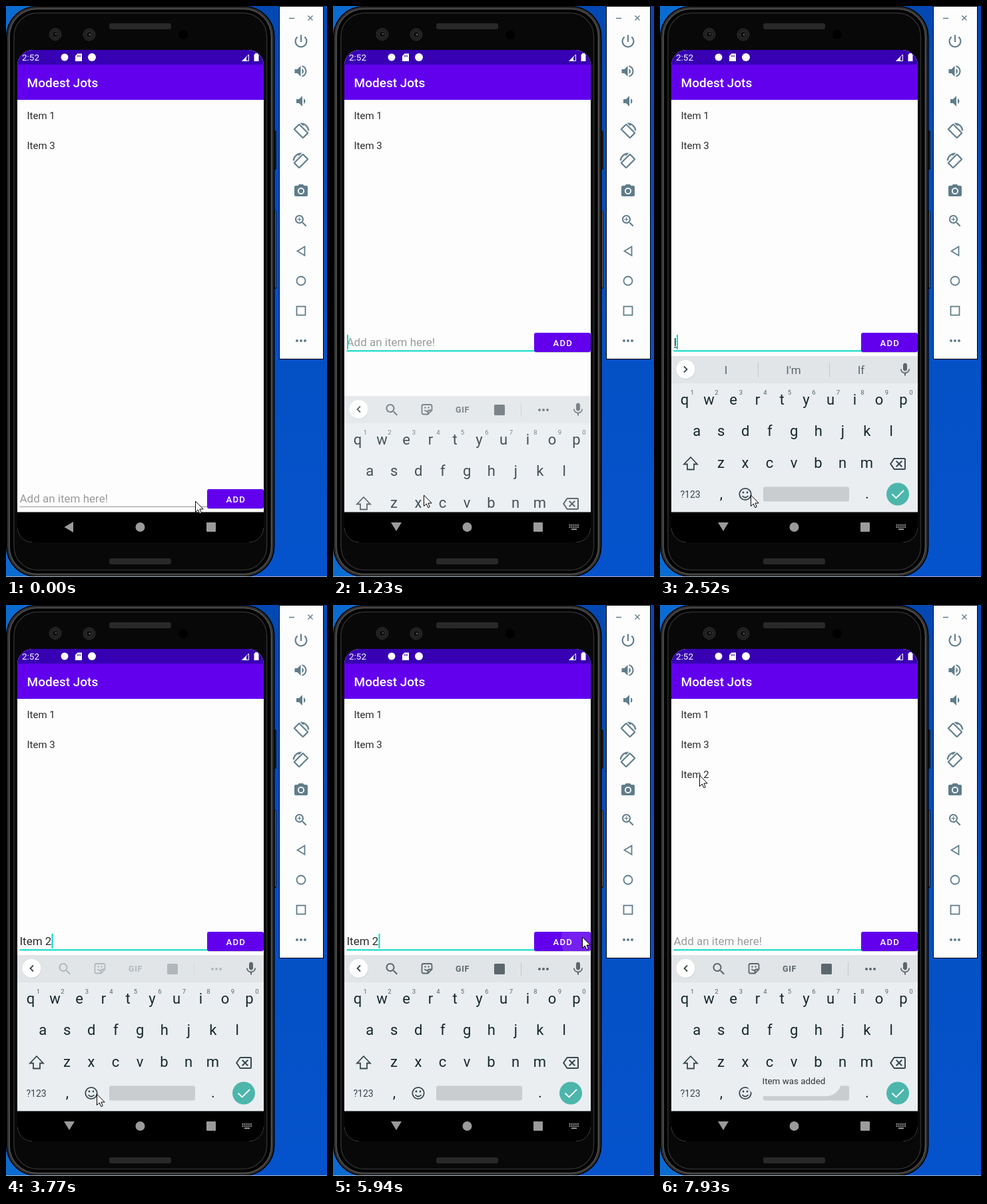
These frames come from a looping animation (482x858 px, 8 s). An HTML page:

```html
<!DOCTYPE html>
<html lang="en">
<head>
<meta charset="utf-8">
<title>Todo list on a phone</title>
<style>
html, body { margin: 0; width: 100%; height: 100%; overflow: hidden; background: #0450c4; }
svg { display: block; width: 482px; height: 858px; font-family: Roboto, "Noto Sans", sans-serif; }
.mid { text-anchor: middle; }
.line { fill: none; stroke-width: 1.8; }
text { white-space: pre; }
</style>
</head>
<body>
<svg viewBox="0 0 482 858" xmlns="http://www.w3.org/2000/svg">
  <defs>
    <linearGradient id="desk" x1="0" y1="0" x2="0" y2="1">
      <stop offset="0" stop-color="#0348b2"/><stop offset=".55" stop-color="#0450c4"/><stop offset="1" stop-color="#0553cc"/>
    </linearGradient>
    <clipPath id="screen"><rect x="17" y="66" width="370" height="740" rx="23"/></clipPath>
    <clipPath id="button"><rect x="302" y="491" width="85" height="29" rx="3"/></clipPath>
    <clipPath id="keysArea"><rect x="17" y="141" width="370" height="620"/></clipPath>
    <path id="search" d="M15.5 14h-.79l-.28-.27C15.41 12.59 16 11.11 16 9.5 16 5.91 13.09 3 9.5 3S3 5.91 3 9.5 5.91 16 9.5 16c1.61 0 3.09-.59 4.23-1.57l.27.28v.79l5 4.99L20.49 19l-4.99-5zm-6 0C7.01 14 5 11.99 5 9.5S7.01 5 9.5 5 14 7.01 14 9.5 11.99 14 9.5 14z"/>
    <path id="rotate" stroke="#607d8b" stroke-width=".9" d="M16.48 2.52c3.27 1.55 5.61 4.72 5.97 8.48h1.5C23.44 4.84 18.29 0 12 0l-.66.03 3.81 3.81 1.33-1.32zm-6.25-.77c-.59-.59-1.54-.59-2.12 0L1.75 8.11c-.59.59-.59 1.54 0 2.12l12.02 12.02c.59.59 1.54.59 2.12 0l6.36-6.36c.59-.59.59-1.54 0-2.12L10.23 1.75zm4.6 19.44L2.81 9.17l6.36-6.36 12.02 12.02-6.36 6.36z"/>
    <path id="mic" d="M12 14c1.66 0 2.99-1.34 2.99-3L15 5c0-1.66-1.34-3-3-3S9 3.34 9 5v6c0 1.66 1.34 3 3 3zm5.3-3c0 3-2.54 5.1-5.3 5.1S6.7 14 6.7 11H5c0 3.41 2.72 6.23 6 6.72V21h2v-3.28c3.28-.48 6-3.3 6-6.72h-1.7z"/>
    <g id="dots"><circle cx="-6" r="2"/><circle r="2"/><circle cx="6" r="2"/></g>
    <pattern id="mesh" width="3" height="3" patternUnits="userSpaceOnUse"><rect width="3" height="3" fill="#303030"/><path d="M0 3L3 0" stroke="#1a1a1a"/></pattern>
  </defs>

  <!-- desktop and phone body -->
  <rect width="482" height="858" fill="url(#desk)"/>
  <rect width="60" height="858" fill="#0a6cd0"/>
  <rect x="401" y="187" width="5" height="59" rx="1.5" fill="#181818"/>
  <rect x="401" y="308" width="5" height="117" rx="1.5" fill="#181818"/>
  <path d="M404.5 309V423" stroke="#6a6a6a"/>
  <rect x=".5" y=".5" width="402.5" height="857" rx="45" fill="#0a0a0a" stroke="#000"/>
  <rect x="4" y="3.5" width="395.5" height="851" rx="42" fill="#080808" stroke="#333" stroke-width="4"/>
  <rect x="5" y="4.5" width="393.5" height="849" rx="41" fill="none" stroke="#5c5c5c"/>
  <rect x="8.5" y="7.5" width="386.5" height="843" rx="38" fill="none" stroke="#000" stroke-width="4"/>
  <rect x="12" y="10.5" width="379.5" height="837" rx="35" fill="#080808" stroke="#2c2c2c" stroke-width="1.5"/>
  <rect y="857" width="482" height="1" fill="#a8b4c4"/>
  <g fill="url(#mesh)"><rect x="155" y="26" width="93" height="9" rx="3"/><rect x="155" y="830" width="93" height="9" rx="3"/></g>
  <g fill="#1f1f1f" stroke="#2f2f2f"><circle cx="74" cy="42.5" r="9"/><circle cx="125" cy="43" r="9"/></g>
  <g fill="#0c0c0c" stroke="#393939"><circle cx="74" cy="42.5" r="4.5"/><circle cx="125" cy="43" r="4.5"/></g>
  <circle cx="126" cy="43" r="1.5" fill="#555"/><circle cx="75" cy="42" r="1.5" fill="#444"/>
  <circle cx="266" cy="43" r="7" fill="#000"/>

  <!-- app -->
  <g clip-path="url(#screen)">
    <rect x="17" y="66" width="370" height="740" fill="#fdfdfd"/>
    <rect x="17" y="66" width="370" height="23" fill="#3700b3"/>
    <rect x="17" y="88" width="370" height="53" fill="#6200ee"/>
    <g fill="#fff">
      <text x="24" y="82" font-size="13.5">2:52</text>
      <circle cx="88" cy="77" r="5.5"/><circle cx="129" cy="77" r="6"/>
      <path d="M107.5 71.5H114V83H104V75Z"/>
      <path d="M107.5 74v2.5m2-2.5v2.5m2-2.5v2.5" stroke="#3700b3"/>
      <path d="M355 82.5L364.5 73V82.5Z" fill="none" stroke="#fff"/><path d="M354 83L361 76V83Z"/>
      <path d="M374 71h4v1.5h1.5V83h-7V72.5h1.5z"/>
      <text x="31.5" y="122" font-size="19" font-weight="500">Modest Jots</text>
    </g>
    <g font-size="15" fill="#2c2c2c">
      <text x="31.5" y="169.5">Item 1</text><text x="31.5" y="215">Item 3</text>
      <text id="added" x="31.5" y="260">Item 2</text>
    </g>

    <g id="field">
      <text id="entry" x="20.5" y="511" font-size="17"></text>
      <rect id="compose" x="21" y="512.5" height="1.2" fill="#333"/>
      <rect id="rule" x="20.5" width="282"/>
      <rect id="caret" y="494" width="2" height="22" fill="#03dac5"/>
      <rect x="302" y="492" width="85" height="29" rx="3" fill="#000" opacity=".18"/>
      <rect x="302" y="491" width="85" height="29" rx="3" fill="#6200ee"/>
      <circle id="ripple" cx="379" cy="503" fill="#fff" clip-path="url(#button)"/>
      <text x="330.5" y="511" font-size="13.2" font-weight="500" letter-spacing="1.2" fill="#fff">ADD</text>
    </g>

    <g clip-path="url(#keysArea)"><g id="board">
      <rect x="17" y="526" width="370" height="235" fill="#eaeef1"/>
      <rect x="17" y="526" width="370" height="41" fill="#e1e5e8"/>
      <circle cx="39" cy="547" r="14" fill="#b8bec2" opacity=".5"/><circle cx="38.5" cy="546" r="14" fill="#fff"/>
      <path id="chevron" class="line" stroke="#37474f"/>
      <g id="tools" fill="#5b676d" stroke="#5b676d" stroke-width="0">
        <use href="#search" transform="translate(76.5 535)"/>
        <path class="line" d="M136 539h10q2.5 0 2.5 2.5v6l-6 6h-6.500q-2.500 0-2.500-2.500v-9.500q0-2.500 2.500-2.500zM148.500 547.500h-3.500q-2.500 0-2.500 2.500v3.500M137.500 547q2 3 5 1.500"/>
        <circle cx="138.5" cy="543.5" r="1.2"/><circle cx="143.5" cy="543.5" r="1.2"/>
        <text class="mid" x="194.5" y="550.5" font-size="12.5" font-weight="700" letter-spacing=".6">GIF</text>
        <rect x="242" y="539" width="16" height="16" rx="1.5"/>
        <path d="M282.5 537V557" stroke="#c3c8cc" stroke-width="1"/>
        <use href="#dots" x="316" y="547"/>
      </g>
      <g id="hints" font-size="17" fill="#5a666c">
        <path d="M147.5 536V558M254.5 536V558" stroke="#c3c8cc"/>
        <text class="mid" x="99" y="553"></text><text class="mid" x="200.5" y="553"></text><text class="mid" x="302" y="553"></text>
      </g>
      <use href="#mic" transform="translate(356 534.5)" fill="#5b676d"/>
      <g id="letters" class="mid" fill="#16282f" font-size="22"></g>
      <text x="30.5" y="738.5" font-size="14" fill="#37474f">?123</text>
      <g stroke="#37474f" class="line">
        <path d="M46 678L56 688.5H51V696.5H41V688.5H36Z"/>
        <circle cx="128" cy="733.5" r="8.7"/><path d="M123.5 736q4.500 5 9 0"/>
      </g>
      <g fill="#37474f"><circle cx="125" cy="731" r="1.4"/><circle cx="131" cy="731" r="1.4"/>
        <path transform="translate(345 676)" d="M22 3H7c-.69 0-1.23.35-1.59.88L0 12l5.41 8.11c.36.53.9.89 1.59.89h15c1.1 0 2-.9 2-2V5c0-1.1-.9-2-2-2zm0 16H7.07L2.4 12l4.66-7H22v14zm-11.59-2L14 13.41 17.59 17 19 15.59 15.41 12 19 8.41 17.59 7 14 10.59 10.41 7 9 8.41 12.59 12 9 15.59z"/>
      </g>
      <rect x="155" y="722.5" width="129" height="22" rx="2.5" fill="#c9cdd0"/>
      <circle cx="357" cy="733.5" r="17" fill="#4db6ac"/>
      <path d="M348.5 733.5L354.5 739.5L366 728" class="line" stroke="#fff"/>
    </g></g>

    <rect x="17" y="760.5" width="370" height="46" fill="#000"/>
    <g fill="#9b9b9b">
      <path id="back"/><circle cx="201.5" cy="783" r="7"/><rect x="301" y="776" width="14" height="14" rx="1"/>
      <g id="ime" stroke="#9b9b9b" stroke-width="2">
        <path d="M354.5 780H369M354.5 783H369" stroke-dasharray="2 1.1"/><path d="M358 786.3H366"/>
      </g>
    </g>
    <g id="toast">
      <rect x="130" y="694" width="142" height="44" rx="22" fill="#eceff1"/>
      <text x="153.5" y="720" font-size="13.4" fill="#333">Item was added</text>
    </g>
  </g>

  <!-- side toolbar -->
  <rect x="410.5" y=".5" width="66" height="530" fill="#fdfdfd" stroke="#000"/>
  <g fill="#607d8b">
    <path d="M425 18.5H433M453.5 14.5L460.5 21.5M460.5 14.5L453.5 21.5" stroke="#607d8b" stroke-width="1.4"/>
    <path transform="translate(430.4 40.4) scale(1.05)" d="M13 3h-2v10h2V3zm4.83 2.17l-1.42 1.42C17.99 7.86 19 9.81 19 12c0 3.87-3.13 7-7 7s-7-3.13-7-7c0-2.19 1.01-4.14 2.58-5.42L6.17 5.17C4.23 6.82 3 9.26 3 12c0 4.97 4.03 9 9 9s9-4.03 9-9c0-2.74-1.23-5.18-3.17-6.83z"/>
    <path transform="translate(430.5 86)" d="M3 9v6h4l5 5V4L7 9H3zm13.5 3c0-1.77-1.02-3.29-2.5-4.03v8.05c1.48-.73 2.5-2.25 2.5-4.02zM14 3.23v2.06c2.89.86 5 3.54 5 6.71s-2.11 5.85-5 6.71v2.06c4.01-.91 7-4.49 7-8.77s-2.99-7.86-7-8.77z"/>
    <path transform="translate(431 131)" d="M18.5 12c0-1.77-1.02-3.29-2.5-4.03v8.05c1.48-.73 2.5-2.25 2.5-4.02zM5 9v6h4l5 5V4L9 9H5z"/>
    <use href="#rotate" transform="translate(431 176)"/>
    <use href="#rotate" transform="translate(455 221) scale(-1 1)"/>
    <g transform="translate(431 266)">
      <path fill-rule="evenodd" d="M9 2L7.17 4H4c-1.1 0-2 .9-2 2v12c0 1.1.9 2 2 2h16c1.1 0 2-.9 2-2V6c0-1.1-.9-2-2-2h-3.17L15 2H9zm3 15c-2.76 0-5-2.24-5-5s2.24-5 5-5 5 2.24 5 5-2.24 5-5 5z"/>
      <circle cx="12" cy="12" r="3.2"/>
    </g>
    <use href="#search" transform="translate(431 311)"/>
    <path d="M437.5 320.5H443.5M440.5 317.5V323.5" stroke="#607d8b" stroke-width="1.2"/>
    <g class="line" stroke="#607d8b">
      <path d="M448.5 361.5V375L437.5 368.2Z"/><circle cx="443" cy="413" r="6.5"/><rect x="436.5" y="451.5" width="13" height="13"/>
    </g>
    <use href="#dots" x="443" y="503"/>
  </g>
  <path id="mouse" d="M0 0V16.5L3.8 13L6.3 18.7L8.8 17.6L6.4 12H11.7Z" fill="#fff" stroke="#000"/>
</svg>
<script>
const $ = id => document.getElementById(id);
const set = (id, attrs) => { for (const k in attrs) $(id).setAttribute(k, attrs[k]); };
const fade = (id, a) => set(id, { opacity: a });

// Keyboard letters: [keys, first x, baseline]
const rows = [['qwertyuiop', 37, 598.5], ['asdfghjkl', 55.3, 645.5], ['zxcvbnm', 91.5, 693.5]];
let keys = '';
rows.forEach(([row, x, y], r) => [...row].forEach((ch, i) => {
  const cx = x + i * 36.5;
  keys += `<text x="${cx}" y="${y}">${ch}</text>`;
  if (!r) keys += `<text x="${cx + 11.5}" y="583.5" font-size="9.5" fill="#56646b">${(i + 1) % 10}</text>`;
}));
$('letters').innerHTML = keys + '<text x="92" y="740">,</text><text x="311" y="740">.</text>';

// Every track is a list of [start time, ...values], held until the next entry
const mouse = [
  [0, 284.5, 744], [130, 255, 690], [250, 215, 615], [370, 180, 579], [490, 175, 625], [610, 138, 690], [730, 119, 727], [850, 136.5, 735],
  [4820, 126.5, 702], [4940, 172, 540], [5060, 265, 346], [5180, 344, 416], [5300, 381, 478], [5450, 378, 494], [5570, 374.5, 499],
  [6970, 350, 580], [7090, 285, 660], [7210, 210, 590], [7330, 150, 460], [7450, 105, 340], [7570, 78, 265], [7690, 68, 234], [7810, 62, 246], [7930, 59.5, 256]];
const typed = [[0, '', 21], [2520, 'I', 25], [2770, 'Ite', 39], [3020, 'Item', 54.5], [3270, 'Item ', 58.5], [3770, 'Item 2', 68.5], [6200, '', 21]];
const words = [[0, '', '', ''], [2520, 'I', "I'm", 'If'], [2770, 'It', "It's", 'Its'], [3020, 'Item', 'Items', 'Itemized'], [3270, 'is', 'in', 'and']];
const blink = [[0, 0], [1110, 1], [1590, 0], [2120, 1], [4450, 0], [4940, 1], [5450, 0], [5940, 1], [6470, 0], [6970, 1], [7450, 0]];
const slide = [[0, 235, 0], [1230, 60, .8], [1350, 0, 1]];
const tools = [[0, 1], [2520, 0], [3770, .35], [3890, .7], [4010, 1]];
const ripple = [[0, 0, 0], [5690, 14, .1], [5820, 25, .12], [5940, 37, .12], [6070, 60, .12], [6200, 85, .07], [6320, 0, 0]];
const toast = [[0, 0], [6200, .2], [6320, .6], [6470, .9], [6590, 1]];
const item = [[0, 0], [6200, .5], [6320, 1]];
const at = (track, t) => track.findLast(e => e[0] <= t).slice(1);

function draw(t) {
  const [mx, my] = at(mouse, t), [text, cx] = at(typed, t);
  const [drop, boardAlpha] = at(slide, t), [icons] = at(tools, t), [r, ra] = at(ripple, t);
  const focus = t >= 970, open = t >= 1230;
  const composing = t >= 2520 && t < 3270, suggesting = t >= 2520 && t < 3770;

  set('mouse', { transform: `translate(${mx} ${my})` });
  set('field', { transform: `translate(0 ${open ? 0 : 235})` });
  $('entry').textContent = text || 'Add an item here!';
  set('entry', { fill: text ? '#2c2c2c' : '#9c9c9c' });
  set('compose', { width: composing ? cx - 21 : 0 });
  set('rule', focus ? { y: 517.3, height: 2, fill: '#03dac5' } : { y: 517, height: 1, fill: '#929292' });
  set('caret', { x: cx, opacity: at(blink, t)[0] });
  set('ripple', { r, opacity: ra });

  set('board', { transform: `translate(0 ${drop})`, opacity: boardAlpha });
  set('chevron', { d: suggesting ? 'M36 541.5L40.5 546L36 550.5' : 'M41 541.5L36.5 546L41 550.5' });
  fade('tools', icons);
  fade('hints', +suggesting);
  const hint = at(words, t);
  $('hints').querySelectorAll('text').forEach((el, i) => el.textContent = hint[i]);

  set('back', { d: open ? 'M87 776H103L95 789Z' : 'M101 775V791L87.5 783Z' });
  fade('ime', +(t >= 1110));
  fade('toast', at(toast, t)[0]);
  fade('added', at(item, t)[0]);
}

const start = performance.now();
function frame() {
  draw((performance.now() - start) % 8000);
  requestAnimationFrame(frame);
}
frame();
</script>
</body>
</html>
```
